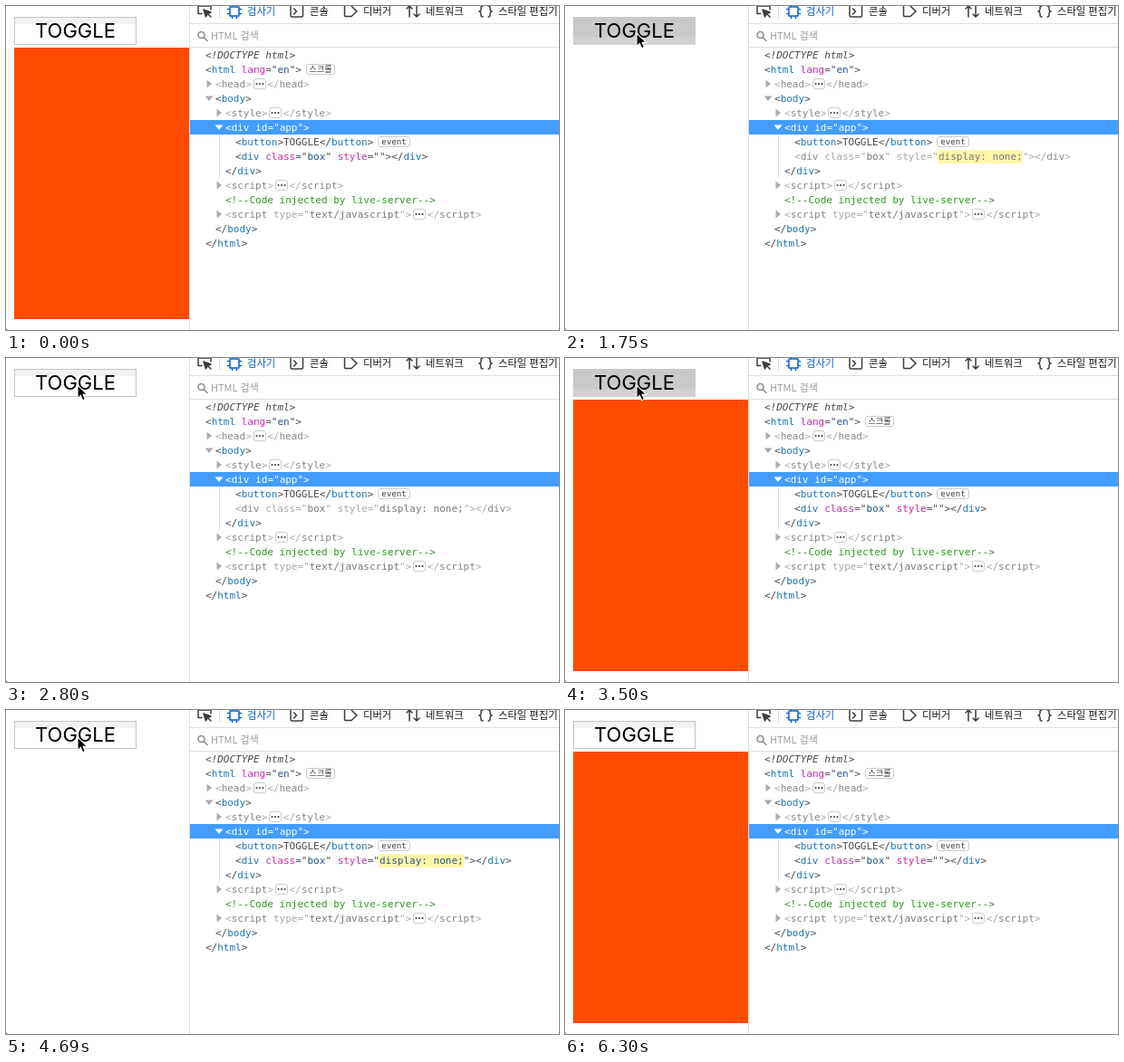
Write an HTML page that moves like this. It is 610 by 358 pixels and loops after 6.51 s.

```html
<!DOCTYPE html>
<html lang="ko">
<head>
<meta charset="utf-8">
<style>
  html, body { margin: 0; width: 100%; height: 100%; overflow: hidden; background: #fff; }
  svg { display: block; width: 610px; height: 358px; }
  text { white-space: pre; }
  .ui { font: 11.3px "Noto Sans CJK KR", "Noto Sans CJK", sans-serif; fill: #18181a; }
  .ui.on { fill: #0a62d6; }
  .ui.hint { font-size: 11px; fill: #9b9b9f; }
  .code { font: 11px "DejaVu Sans Mono", monospace; fill: #48484c; }
  .tag { fill: #1c74b4; }
  .attr { fill: #c22bb0; }
  .value { fill: #24548c; }
  .dim, .dim .attr { fill: #a9a9ab; }
  .dim .tag { fill: #87878a; }
  .dim .value { fill: #77777a; }
  .picked, .picked tspan { fill: #fff; }
  .comment { fill: #2f9624; }
  .badge rect { fill: #fff; stroke: #cbcbce; }
  .badge text { font: 9.2px "DejaVu Sans Mono", "Noto Sans CJK KR", monospace; fill: #3c3c40; text-anchor: middle; }
  .label { font: 22px Inter, sans-serif; text-anchor: middle; }
  .icon { fill: none; stroke: #3c3c40; stroke-width: 1.5; stroke-linejoin: round; stroke-linecap: round; }
  .icon.on { stroke: #0a62d6; }
</style>
</head>
<body>
<svg viewBox="0 0 610 358">
  <!-- page -->
  <g id="idle">
    <rect x="9.5" y="12.5" width="134" height="30" fill="#fff" stroke="#c3c3c3"/>
    <rect x="10" y="13" width="133" height="7" fill="#f1f1f1"/>
  </g>
  <g id="pressed">
    <rect x="9" y="12" width="135" height="31" fill="#c9c9c9"/>
    <rect x="9" y="34" width="135" height="9" fill="#d1d1d1"/>
  </g>
  <text class="label" x="76.5" y="35">TOGGLE</text>
  <rect id="box" x="9" y="46" width="193" height="300" fill="#ff4b00"/>
  <path d="M0 355v3h3q-2 0-3-3z" fill="#aaa"/>

  <!-- toolbar -->
  <path d="M202.5 0V358M203 19.5H610M203 45.5H610M235.5 0V14" stroke="#dedee0"/>
  <g class="icon">
    <path d="M212 0V8.500H216M212 0H226V4"/>
    <path d="M218 4l8 3-3.500 1.500L220.500 12zM223 9l3 3" fill="#3c3c40"/>
    <path d="M314 0V10.500q0 1.500 1.500 1.500H326q1.500 0 1.500-1.500V0M317.500 3l3 3-3 3"/>
    <path d="M373.500 0V10.500q0 1 1 1H381l6-5.500-6-6"/>
    <path d="M445 12V0M442 3l3-3 3 3M453 0V12M450 9l3 3 3-3"/>
    <path d="M526 0q-2 0-2 2v1.500q0 2-2 2.500 2 .5 2 2.500V10q0 2 2 2M532 0q2 0 2 2v1.500q0 2 2 2.500-2 .5-2 2.500V10q0 2-2 2"/>
    <g stroke="#8a8a8e"><circle cx="215.500" cy="32" r="3.500"/><path d="M218 34.500l4 4"/></g>
  </g>
  <path class="icon on" d="M247 1H257V11H247zM249.500 1V-2M254.500 1V-2M249.500 11v2.500M254.500 11v2.500M247 3.500h-2.500M247 8.500h-2.500M257 3.500h2.500M257 8.500h2.500"/>
  <text class="ui on" x="266" y="10">검사기</text>
  <text class="ui" x="335" y="10">콘솔</text>
  <text class="ui" x="394" y="10">디버거</text>
  <text class="ui" x="463" y="10">네트워크</text>
  <text class="ui" x="543" y="10">스타일 편집기</text>
  <text class="ui hint" x="226" y="37">HTML 검색</text>

  <!-- markup tree -->
  <rect x="203" y="126" width="407" height="16" fill="#439cff"/>
  <path d="M235.500 142V190" stroke="#dcdcde"/>
  <rect id="flash" x="411" y="159" width="94" height="15" rx="2" fill="#fff7a8"/>
  <g id="tree"></g>

  <path id="arrow" d="M0 0V14.500L3.300 11.400 5.600 16.700 8.400 15.500 6.100 10.400H10.600z" fill="#000" stroke="#fff" stroke-width="1.100"/>
  <path id="resize" d="M-8 0l5-4.500V-1.500H-1.700V-7H-.3V-1.500H.3V-7H1.700V-1.500H3V-4.500L8 0 3 4.500V1.500H1.700V7H.3V1.500H-.3V7H-1.700V1.500H-3V4.500z" fill="#000" stroke="#fff" stroke-width="1.200" paint-order="stroke"/>
</svg>
<script>
  const LOOP = 6510, STEP = 70, CHAR = 6.623;
  const $ = id => document.getElementById(id);
  const tree = $("tree");
  const escape = s => s.replace(/&/g, "&amp;").replace(/</g, "&lt;");

  function paint(code) {
    const token = /(<\/?)(\w+)|([\w-]+)(=")([^"]*)(")|[^<\s]+|\s+|</g;
    return code.replace(token, (all, open, tag, attr, eq, value, quote) =>
      tag ? `${escape(open)}<tspan class="tag">${tag}</tspan>`
      : attr ? `<tspan class="attr">${attr}</tspan>${eq}<tspan class="value">${value}</tspan>${quote}`
      : escape(all));
  }

  const add = html => tree.insertAdjacentHTML("beforeend", html);

  function row(line, x, code, style = "", id = "") {
    const plain = style === "comment" || code.startsWith("<!");
    add(`<text id="${id}" class="code ${style}" x="${x}" y="${58 + 16 * line}">${plain ? escape(code) : paint(code)}</text>`);
  }

  function badge(line, x, width, label, id = "") {
    const y = 54 + 16 * line;
    const inside = label ? `<text x="${x + width / 2}" y="${y + 3.3}">${label}</text>`
      : [-3.5, 0, 3.5].map(d => `<circle cx="${x + width / 2 + d}" cy="${y}" r="1.1" fill="#48484c"/>`).join("");
    add(`<g class="badge" id="${id}"><rect x="${x + .5}" y="${y - 5.5}" width="${width - 1}" height="11" rx="2.5"/>${inside}</g>`);
  }

  function twisty(line, x, open, fill = "#ababad") {
    const y = 54 + 16 * line;
    add(`<path d="${open ? `M${x - 4.5} ${y - 2.5}h9l-4.500 5.500z` : `M${x - 2.5} ${y - 4.5}v9l5.500-4.500z`}" fill="${fill}"/>`);
  }

  function folded(line, x, open, close) {
    const end = x + open.length * CHAR;
    twisty(line, x - 7, false);
    row(line, x, open, "dim");
    badge(line, Math.round(end + 2), 14);
    row(line, end + 17.5, close, "dim");
  }

  row(0, 220, "<!DOCTYPE html>");
  tree.lastChild.style.fontStyle = "italic";
  row(1, 220, '<html lang="en">');
  badge(1, 331, 32, "스크롤", "scroll");
  folded(2, 231, "<head>", "</head>");
  twisty(3, 224, true);
  row(3, 231, "<body>");
  folded(4, 242, "<style>", "</style>");
  twisty(5, 235, true, "#fff");
  row(5, 242, '<div id="app">', "picked");
  row(6, 253, "<button>TOGGLE</button>");
  badge(6, 410, 36, "event");
  row(7, 253, "", "", "node");
  row(8, 242, "</div>");
  folded(9, 242, "<script>", "<\/script>");
  row(10, 242, "<!--Code injected by live-server-->", "comment");
  folded(11, 242, '<script type="text/javascript">', "<\/script>");
  row(12, 231, "</body>");
  row(13, 220, "</html>");

  // each click: press time, release time; every release toggles the box
  const clicks = [[1050, 1400], [1680, 1820], [2030, 2170], [2870, 3010],
                  [3360, 3570], [3990, 4200], [4480, 4620], [5250, 5390]];
  const hiddenAt = t => clicks.filter(c => t >= c[1]).length % 2 === 1;
  const clamp = v => Math.min(1, Math.max(0, v));
  const show = (id, on) => $(id).style.display = on ? "" : "none";
  const BUTTON = [79, 30], SPLIT = [205, 228];

  function pointer(t) {
    const go = (a, b, p) => a.map((v, i) => v + (b[i] - v) * p);
    if (t < 70 || t >= 6160) return null;
    if (t < 840) {
      const p = clamp((t - 70) / 770);
      return go([580, 350], BUTTON, 1 - (1 - p) ** 2);
    }
    if (t < 5670) return go(BUTTON, SPLIT, clamp((t - 5390) / 280) ** 1.5);
    return go(SPLIT, [290, 362], clamp((t - 5670) / 490));
  }

  let shown = null;
  function draw(t) {
    const down = clicks.some(([a, b]) => t >= a && t < b);
    const hidden = hiddenAt(t), late = hiddenAt(t - 140);
    show("pressed", down);
    show("idle", !down);
    show("box", !hidden);
    show("scroll", !late);

    const key = `${hidden}${late}`;
    if (key !== shown) {
      shown = key;
      $("node").innerHTML = paint(`<div class="box" style="${hidden ? "display: none;" : ""}"></div>`);
      $("node").setAttribute("class", late ? "code dim" : "code");
    }

    const last = clicks.filter(c => t >= c[1]).pop();
    $("flash").style.opacity = hidden ? 1 - clamp((t - last[1] - 370) / 200) : 0;

    const at = pointer(t);
    const onSplit = at && Math.abs(at[0] - SPLIT[0]) < 4;
    show("arrow", at && !onSplit);
    show("resize", onSplit);
    if (at) for (const id of ["arrow", "resize"]) $(id).setAttribute("transform", `translate(${at})`);
  }

  const start = performance.now();
  function tick() {
    const t = (performance.now() - start) % LOOP;
    draw(Math.floor(t / STEP) * STEP);
    requestAnimationFrame(tick);
  }
  tick();
</script>
</body>
</html>
```
